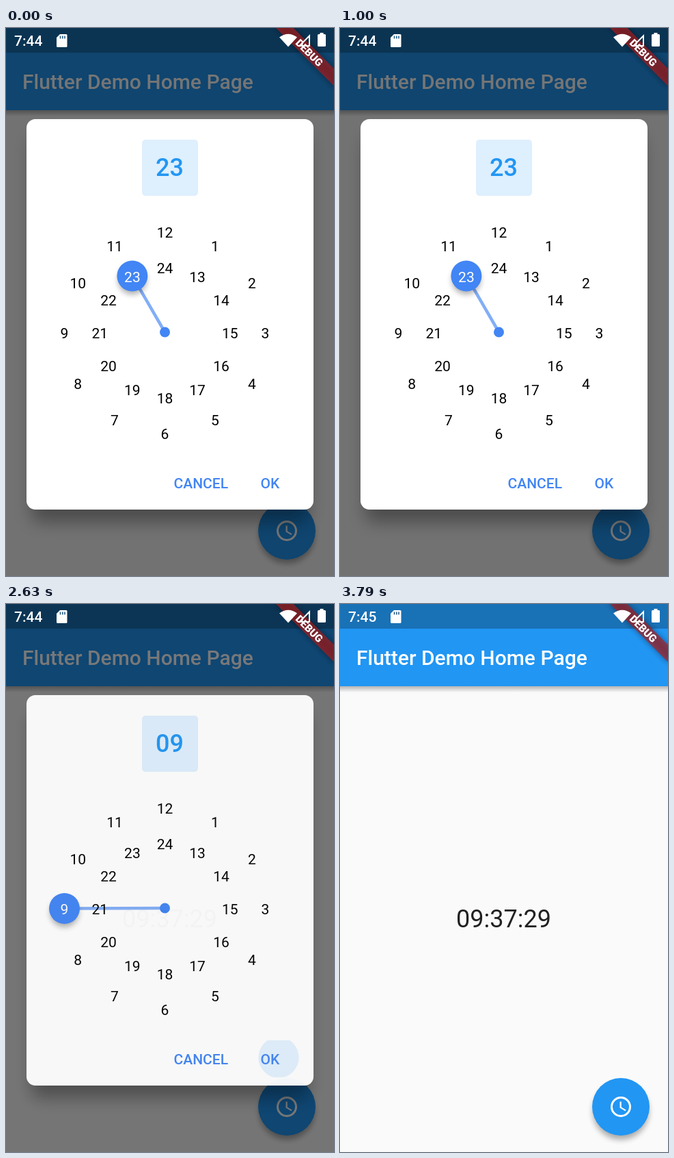
An HTML page that plays this animation: 480x800 px, repeating every 3920 ms.

```html
<!DOCTYPE html>
<html lang="en">
<head>
<meta charset="utf-8">
<title>Hour picker</title>
<style>
  html, body { margin: 0; width: 100%; height: 100%; overflow: hidden; }
  svg { display: block; width: 100vw; height: 100vh; }
  text { font-family: Roboto, sans-serif; font-size: 21px; }
  .medium { font-weight: 500; }
  .large { font-size: 36px; }
  .middle { text-anchor: middle; }
</style>
</head>
<body>
<svg viewBox="0 0 480 800">
  <defs>
    <filter id="wide" x="-20%" y="-20%" width="140%" height="140%"><feGaussianBlur stdDeviation="12"/></filter>
    <filter id="soft" x="-40%" y="-40%" width="180%" height="180%"><feGaussianBlur stdDeviation="4.5"/></filter>
    <linearGradient id="fade" x2="0" y2="1">
      <stop stop-opacity=".28"/>
      <stop offset="1" stop-opacity="0"/>
    </linearGradient>
    <clipPath id="knobClip"><circle id="knobHole" r="22.5"/></clipPath>
    <clipPath id="okClip"><rect x="340" y="637" width="95" height="54" rx="6"/></clipPath>
  </defs>

  <g id="page">
    <rect width="480" height="800" fill="#fafafa"/>
    <rect y="120" width="480" height="9" fill="url(#fade)"/>
    <rect width="480" height="120" fill="#2196f3"/>
    <rect width="480" height="36" opacity=".25"/>
    <text class="medium" x="24" y="89" style="font-size:30px" fill="#fff">Flutter Demo Home Page</text>
    <text class="large middle" x="239.5" y="472" fill="#212121">09:37:29</text>
    <circle cx="411" cy="741" r="41" opacity=".32" filter="url(#soft)"/>
    <circle cx="411" cy="734" r="42" fill="#2196f3"/>
    <g transform="translate(393 716) scale(1.5)" fill="#fff">
      <circle cx="12" cy="12" r="9" fill="none" stroke="#fff" stroke-width="2"/>
      <path d="M12.5 7H11v6l5.25 3.15.75-1.23-4.5-2.67z"/>
    </g>
  </g>
  <rect id="barrier" width="480" height="800"/>

  <g id="dialog">
    <rect x="37" y="158" width="406" height="563" rx="14" opacity=".34" filter="url(#wide)"/>
    <rect x="30" y="133" width="420" height="570" rx="13" fill="#fff"/>
    <rect x="199" y="163" width="82" height="82" rx="5" fill="#2196f3" opacity=".15"/>
    <text id="hour" class="large medium middle" x="239.5" y="216" fill="#2196f3"></text>
    <line id="hand" x1="232.5" y1="444" stroke="#4285f4" stroke-width="4.5" opacity=".66"/>
    <circle cx="232.5" cy="444" r="7.5" fill="#4285f4"/>
    <g id="labels" class="middle"></g>
    <g id="knob">
      <circle cy="6" r="21" opacity=".32" filter="url(#soft)"/>
      <circle r="22.5" fill="#4285f4"/>
    </g>
    <g clip-path="url(#knobClip)"><g id="lightLabels" class="middle" fill="#fff"></g></g>
    <g clip-path="url(#okClip)"><circle id="ripple" cx="399" cy="662" fill="#2196f3" opacity=".13"/></g>
    <g class="medium" fill="#4285f4">
      <text x="245.5" y="672">CANCEL</text>
      <text x="372.5" y="672">OK</text>
    </g>
  </g>

  <g transform="translate(480 0) rotate(45)">
    <rect x="-60" y="42" width="120" height="18" opacity=".4" filter="url(#soft)"/>
    <rect x="-62" y="42" width="124" height="18" fill="#b71c1c" opacity=".63"/>
    <text class="middle" y="56.5" fill="#fff" style="font-size:15.3px;font-weight:900">DEBUG</text>
  </g>
  <g fill="#fff">
    <text id="status" class="medium" x="12" y="26"></text>
    <path d="M79 9h9q1.5 0 1.5 1.5v16q0 1.5-1.5 1.5h-12.5q-1.5 0-1.5-1.5V14z"/>
    <path d="M79.5 11.5v4M82.8 11.5v4M86 11.5v4" stroke="#1a527f" stroke-width="1.5"/>
    <path d="M400 13.5Q413 4 426 13.5L413 27.500z"/>
    <path d="M444 11.5V26H429.500z" fill="none" stroke="#fff" stroke-width="2"/>
    <path d="M459.5 7h5v2h2q1.5 0 1.5 1.5v15q0 1.5-1.5 1.5h-9q-1.5 0-1.5-1.5v-15q0-1.5 1.5-1.5h2z"/>
  </g>
</svg>
<script>
const LOOP = 3920, TAP = 1340, PRESS_OK = 2590, CLOSE = 2605, MINUTE = 3250;
const CENTER = { x: 232.5, y: 444.5 }, OUTER = 147, INNER = 95.3;
const el = id => document.getElementById(id);
const set = (id, attrs) => {
  for (const name in attrs) el(id).setAttribute(name, attrs[name]);
};
const clamp = v => Math.min(1, Math.max(0, v));
const lerp = (a, b, k) => a + (b - a) * k;

function bezier(x1, y1, x2, y2) {
  const at = (a, b, s) => 3 * a * s * (1 - s) ** 2 + 3 * b * s * s * (1 - s) + s ** 3;
  return x => {
    let low = 0, high = 1;
    for (let i = 0; i < 24; i++) {
      const mid = (low + high) / 2;
      if (at(x1, x2, mid) < x) low = mid; else high = mid;
    }
    return x <= 0 ? 0 : x >= 1 ? 1 : at(y1, y2, low);
  };
}
const ease = bezier(.25, .1, .25, 1);
const easeOut = bezier(0, 0, .58, 1);
const fastOutSlowIn = bezier(.4, 0, .2, 1);

function dialPoint(degrees, radius) {
  const a = degrees * Math.PI / 180;
  return { x: CENTER.x + Math.sin(a) * radius, y: CENTER.y - Math.cos(a) * radius };
}

function dialLabels() {
  let markup = '';
  for (let n = 1; n <= 24; n++) {
    const p = dialPoint(n * 30, n > 12 ? INNER : OUTER);
    markup += `<text x="${p.x.toFixed(1)}" y="${(p.y + 8.5).toFixed(1)}">${n}</text>`;
  }
  return markup;
}
el('labels').innerHTML = el('lightLabels').innerHTML = dialLabels();

function draw(t) {
  const turn = fastOutSlowIn(clamp((t - TAP) / 200));
  const { x, y } = dialPoint(lerp(-30, -90, turn), lerp(INNER, OUTER, turn));
  set('hand', { x2: x, y2: y });
  set('knob', { transform: `translate(${x} ${y})` });
  set('knobHole', { cx: x, cy: y });
  el('hour').textContent = t < TAP ? '23' : '09';

  const open = 1 - clamp((t - CLOSE) / 150);
  set('barrier', { opacity: .54 * ease(open) });
  set('dialog', { opacity: easeOut(open) });
  set('ripple', { r: t < PRESS_OK ? 0 : 10 + (t - PRESS_OK) * .48 });
  el('status').textContent = t < MINUTE ? '7:44' : '7:45';
}

function tick() {
  draw(performance.now() % LOOP);
  requestAnimationFrame(tick);
}
tick();
</script>
</body>
</html>
```
